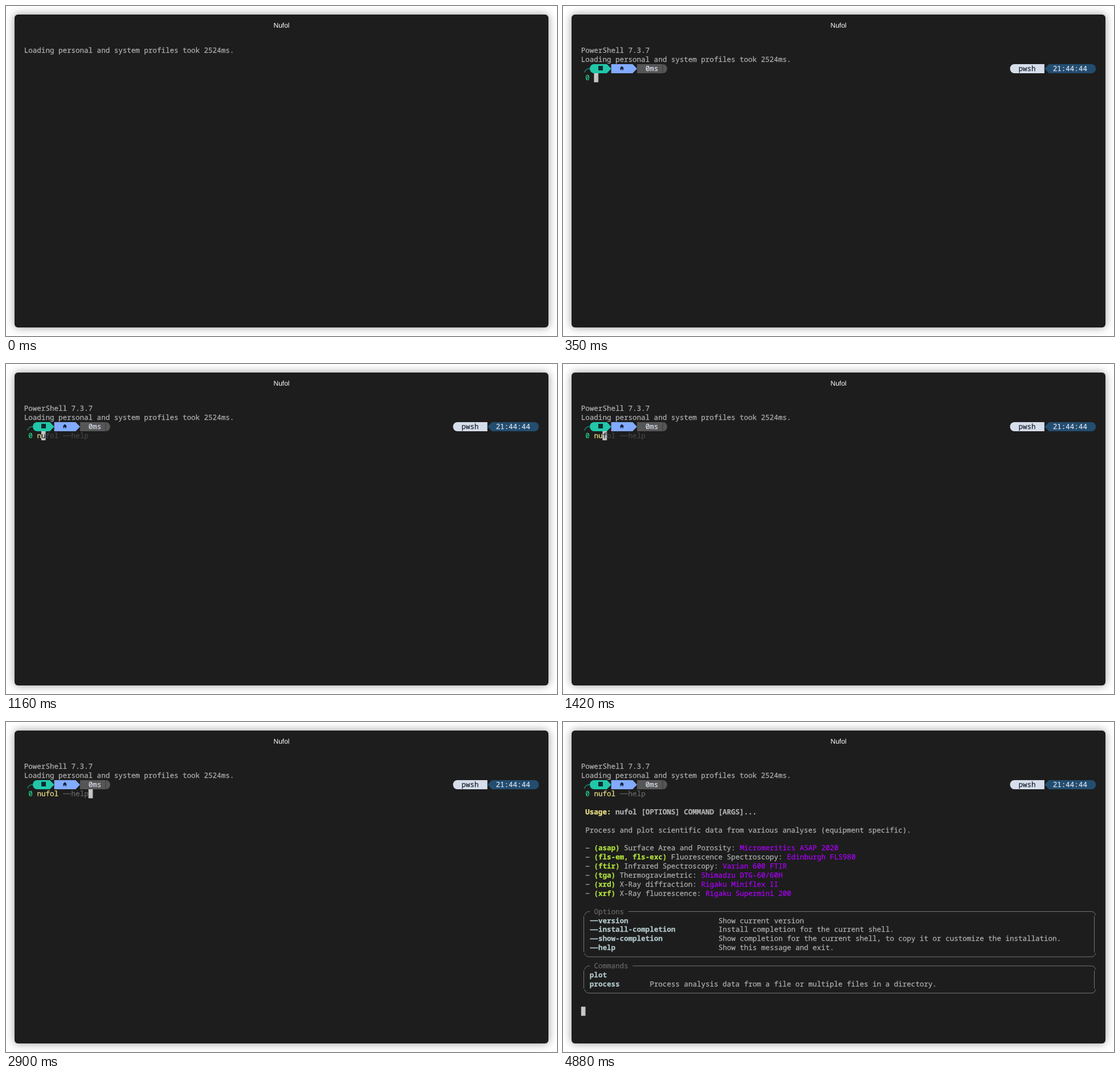
Recreate the animation shown at these times as an HTML page. Size 967 by 579 pixels, loop 5720 ms.

```html
<!DOCTYPE html>
<html lang="en">
<head>
<meta charset="utf-8">
<title>Nufol</title>
<style>
html, body { margin: 0; width: 100%; height: 100%; overflow: hidden; background: #fff; }
.window {
  position: absolute; left: 15px; top: 15px; width: 937px; height: 549px;
  border-radius: 6px; background: #1d1d1d; box-shadow: 0 0 15px rgba(0, 0, 0, .4);
}
svg { position: absolute; left: 0; top: 0; width: 967px; height: 579px; }
text {
  font: 400 12.545px "Noto Sans Mono", "DejaVu Sans Mono", monospace;
  text-rendering: geometricPrecision; white-space: pre;
  fill: currentColor; stroke: currentColor; stroke-width: .25px;
}
.title { font: 12px "Liberation Sans", Arial, sans-serif; fill: #fff; stroke: none; text-anchor: middle; }
.dash { fill: currentColor; }
.hide { fill: none; stroke: none; }
.b { font-weight: 700; }
.fg { color: #afafaf; }
.dim { color: #666; }
.grey { color: #626566; }
.ghost { color: #444; }
.yellow { color: #ebdf86; }
.green { color: #b3e33b; }
.cyan { color: #b1c6ca; }
.purple { color: #a900f6; }
.ok { color: #22cf86; }
.light { color: #d6deeb; }
.dark { color: #1d2733; }
.line { fill: none; stroke: #757575; stroke-width: 1; }
#cursor { fill: #c7c7c7; }

#boot, #main, #prompt, #type1, #type2, #type3, #help, #cursor {
  animation: 5720ms step-end infinite;
}
#boot { animation-name: boot; }
#main { animation-name: main; }
#prompt { animation-name: prompt; }
#type1 { animation-name: type1; }
#type2 { animation-name: type2; }
#type3 { animation-name: type3; }
#help { animation-name: help; }
#cursor { animation-name: cursor; }

@keyframes boot { 0% { opacity: 1 } 1.7482%, 100% { opacity: 0 } }
@keyframes main { 0% { opacity: 0 } 1.7482%, 100% { opacity: 1 } }
@keyframes prompt { 0% { opacity: 0 } 6.1188%, 100% { opacity: 1 } }
@keyframes type1 { 0% { opacity: 0 } 20.2797% { opacity: 1 } 24.8251%, 100% { opacity: 0 } }
@keyframes type2 { 0% { opacity: 0 } 24.8251% { opacity: 1 } 31.8181%, 100% { opacity: 0 } }
@keyframes type3 { 0% { opacity: 0 } 31.8181%, 100% { opacity: 1 } }
@keyframes help { 0% { opacity: 0 } 63.2867%, 100% { opacity: 1 } }
@keyframes cursor {
  0% { opacity: 0; transform: translate(31.8px, 101.9px) }
  1.7482% { opacity: 1; transform: translate(31.8px, 101.9px) }
  6.1188% { opacity: 1; transform: translate(54.4px, 117.8px) }
  20.2797% { opacity: 1; transform: translate(61.9px, 117.8px) }
  24.8251% { opacity: 1; transform: translate(69.4px, 117.8px) }
  31.8181% { opacity: 1; transform: translate(144.7px, 117.8px) }
  63.2867%, 100% { opacity: 1; transform: translate(31.8px, 499.5px) }
}
</style>
</head>
<body>
<div class="window"></div>
<svg viewBox="0 0 967 579">
  <text class="title" x="483.5" y="38.3">Nufol</text>
  <rect id="cursor" width="7.6" height="16"/>
  <g id="boot"></g>
  <g id="main"></g>
  <g id="prompt">
    <path d="M38 116.5Q39 110 47 109.8" fill="none" stroke="#21c7a8"/>
    <path d="M54.6 102H77L84.6 110L77 118H54.6A7.6 8 0 0 1 54.6 102Z" fill="#21c7a8"/>
    <rect x="62" y="105" width="8" height="8" fill="#0b2a2c"/>
    <path d="M84.6 102H122.2L129.9 110L122.2 118H84.6Z" fill="#82aaff"/>
    <path d="M103.3 105.6L107 109.2H105.9V112.4H104.1V110.2H102.5V112.4H100.7V109.2H99.6Z" fill="#0c1c33"/>
    <path d="M129.9 102H174.7V118H129.9ZM175.2 102A7.6 8 0 0 1 175.2 118Z" fill="#575656"/>
    <path d="M792.1 102H844.8V118H792.1A7.6 8 0 0 1 792.1 102Z" fill="#d6deeb"/>
    <path d="M852.8 102H927.6A7.6 8 0 0 1 927.6 118H852.8L845.2 110Z" fill="#234d70"/>
  </g>
  <g id="type1"></g>
  <g id="type2"></g>
  <g id="type3"></g>
  <g id="help"></g>
</svg>
<script>
const CELL_W = 7.527, CELL_H = 15.905, LEFT = 31.8, TOP = 70.1;
const colX = col => LEFT + col * CELL_W;
const midY = row => TOP + (row + .5) * CELL_H;

function add(parent, tag, attrs, text = '') {
  const el = document.createElementNS('http://www.w3.org/2000/svg', tag);
  for (const key in attrs) el.setAttribute(key, attrs[key]);
  el.textContent = text;
  parent.append(el);
  return el;
}

// Writes text at a cell; leading dashes join into one bar. Returns the next column.
function put(id, row, col, text, cls = 'fg') {
  const group = document.getElementById(id);
  const y = TOP + row * CELL_H + 12.1;
  const dashes = text.match(/^-*/)[0];
  const n = dashes.length;
  if (n) {
    const h = cls.startsWith('b ') ? 1.7 : 1.2;
    add(group, 'rect', {
      class: 'dash ' + cls, x: colX(col) + .5, y: midY(row) - h / 2 + .2,
      width: n * CELL_W - 1, height: h
    });
    add(group, 'text', { class: 'hide', x: colX(col), y }, dashes);
  }
  if (text.length > n) add(group, 'text', { class: cls, x: colX(col + n), y }, text.slice(n));
  return col + text.length;
}

// Panel with a heading set into its top edge.
function panel(top, bottom, heading) {
  const y1 = midY(top), y2 = midY(bottom), gap = colX(heading.length + 4);
  put('help', top, 3, heading, 'dim');
  add(document.getElementById('help'), 'path', {
    class: 'line',
    d: `M38 ${y1 + 6.5}Q39 ${y1} 47 ${y1}M${gap} ${y1}H927Q933.5 ${y1} 934.5 ${y1 + 6.5}
        M38 ${y2 - 6.5}Q39 ${y2} 47 ${y2}H927Q933.5 ${y2} 934.5 ${y2 - 6.5}
        M36.5 ${y1 + 8}V${y2 - 8}M932.5 ${y1 + 8}V${y2 - 8}`
  });
}

const loading = 'Loading personal and system profiles took 2524ms.';
put('boot', 0, 0, loading);
put('main', 0, 0, 'PowerShell 7.3.7');
put('main', 1, 0, loading);

put('prompt', 2, 15, '0ms', 'light');
put('prompt', 2, 102, 'pwsh', 'dark');
put('prompt', 2, 110, '21:44:44', 'light');
put('prompt', 3, 1, '0', 'ok');

const command = 'nufol';
for (const n of [1, 2]) {
  const id = 'type' + n;
  put(id, 3, 3, command.slice(0, n), 'yellow');
  put(id, 3, 3 + n, command[n], 'dark');
  put(id, 3, 4 + n, command.slice(n + 1), 'ghost');
  put(id, 3, 9, '--help', 'ghost');
}
put('type3', 3, 3, command, 'yellow');
put('type3', 3, 9, '--help', 'grey');

put('help', 5, 1, 'Usage:', 'b yellow');
put('help', 5, 8, command + ' [OPTIONS] COMMAND [ARGS]...', 'b fg');
put('help', 7, 1, 'Process and plot scientific data from various analyses (equipment specific).');

[
  ['(asap)', 'Surface Area and Porosity:', 'Micromeritics ASAP 2020'],
  ['(fls-em, fls-exc)', 'Fluorescence Spectroscopy:', 'Edinburgh FLS980'],
  ['(ftir)', 'Infrared Spectroscopy:', 'Varian 600 FTIR'],
  ['(tga)', 'Thermogravimetric:', 'Shimadzu DTG-60/60H'],
  ['(xrd)', 'X-Ray diffraction:', 'Rigaku Miniflex II'],
  ['(xrf)', 'X-Ray fluorescence:', 'Rigaku Supermini 200']
].forEach(([key, method, device], i) => {
  const row = 9 + i;
  put('help', row, 1, '-');
  let col = put('help', row, 3, key, 'b green') + 1;
  col = put('help', row, col, method) + 1;
  put('help', row, col, device, 'purple');
});

panel(16, 21, 'Options');
[
  ['--version', 'Show current version'],
  ['--install-completion', 'Install completion for the current shell.'],
  ['--show-completion', 'Show completion for the current shell, to copy it or customize the installation.'],
  ['--help', 'Show this message and exit.']
].forEach(([flag, info], i) => {
  put('help', 17 + i, 2, flag, 'b cyan');
  put('help', 17 + i, 32, info);
});

panel(22, 25, 'Commands');
put('help', 23, 2, 'plot', 'b cyan');
put('help', 24, 2, 'process', 'b cyan');
put('help', 24, 16, 'Process analysis data from a file or multiple files in a directory.');
</script>
</body>
</html>
```
